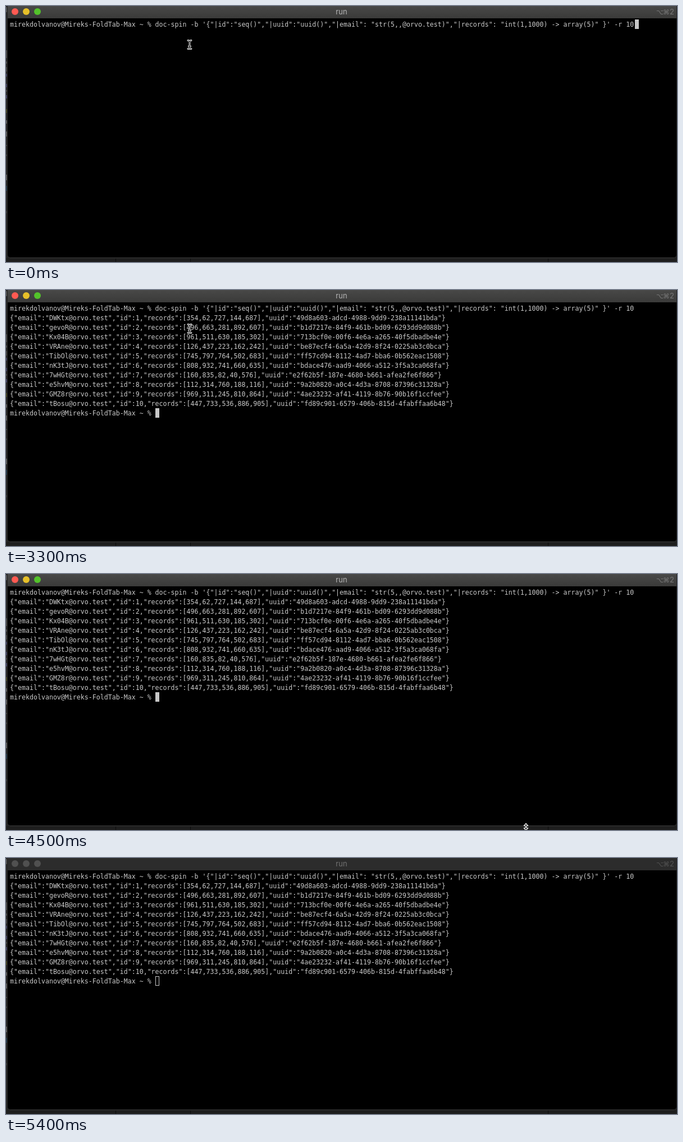
Write an HTML page that moves like this. It is 1195 px wide and 457 px high and loops after 5500 ms.

```html
<!DOCTYPE html>
<html lang="en">
<head>
<meta charset="utf-8">
<title>Terminal</title>
<style>
  html, body { margin: 0; width: 100%; height: 100%; overflow: hidden; background: #1f1f1f; }
  #stage { position: absolute; left: 0; top: 0; width: 1195px; height: 457px; overflow: hidden; }
  svg { position: absolute; left: 0; top: 0; }

  .window {
    position: absolute; left: 3px; top: -1px; width: 1191px; height: 451px;
    box-sizing: border-box; border-bottom: 1px solid #3c3c3c;
    border-radius: 0 0 5px 5px; background: #000; overflow: hidden;
  }
  .bar { position: absolute; inset: 0 0 auto; height: 23px; background: linear-gradient(#494948, #3a3a39); }
  .bar.idle { background: #2c2c2c; }

  .chrome text { font: 13px Inter, "Liberation Sans", sans-serif; text-anchor: middle; }
  .chrome .key { font: 11.5px "DejaVu Sans", sans-serif; }

  pre {
    position: absolute; left: 7px; margin: 0; color: #c9c9c9;
    font: 11.627px/17px "DejaVu Sans Mono", monospace; font-variant-ligatures: none;
  }
  #command { top: 25px; }
  #output { top: 42px; }

  .caret { position: absolute; left: 0; top: 0; width: 7px; height: 17px; box-sizing: border-box; border: 1px solid #c7c7c7; }

  /* Every part holds its state and changes hard. */
  .active, .idle, #output, .caret, #beam, #resize { animation: 5500ms step-end infinite; }
  .active { animation-name: active; }
  .idle { animation-name: idle; }
  #output { animation-name: print; }
  .caret { animation-name: caret; }
  #beam { animation-name: beam; }
  #resize { animation-name: resize; }

  @keyframes active { 0% { visibility: visible } 98.1818%, 100% { visibility: hidden } }
  @keyframes idle { 0% { visibility: hidden } 98.1818%, 100% { visibility: visible } }
  @keyframes print { 0% { visibility: hidden } 43.6363%, 100% { visibility: visible } }
  @keyframes caret {
    0% { transform: translate(1120px, 24px); background: #c7c7c7 }
    43.6363% { transform: translate(266px, 211px); background: #c7c7c7 }
    98.1818%, 100% { transform: translate(266px, 211px); background: transparent }
  }
  @keyframes beam {
    0% { transform: translate(327px, 69px); visibility: visible }
    70.909% { transform: translate(386.5px, 67.5px); visibility: visible }
    73.6363% { transform: translate(425.5px, 56.5px); visibility: visible }
    81.8181%, 100% { transform: translate(425.5px, 56.5px); visibility: hidden }
  }
  @keyframes resize {
    0% { visibility: hidden }
    81.8181% { visibility: visible }
    84.5454%, 100% { visibility: hidden }
  }
</style>
</head>
<body>
<div id="stage">
  <!-- edges of the windows behind -->
  <svg width="1195" height="457">
    <rect width="3" height="457" fill="#262626"/>
    <g id="specks"></g>
    <rect y="450" width="1195" height="7" fill="#1e1e1e"/>
    <path d="M195.5 451v6M328.5 451v6M965.5 451v6" stroke="#0c0c0c"/>
  </svg>

  <div class="window">
    <div class="bar active"></div>
    <div class="bar idle"></div>
  </div>

  <svg class="chrome" width="1195" height="457">
    <g class="active">
      <circle cx="16" cy="10" r="6" fill="#ff5a52"/>
      <circle cx="36" cy="10" r="6" fill="#e6c029"/>
      <circle cx="56" cy="10" r="6" fill="#53c22b"/>
      <g fill="#b8b8b8"><text x="597.5" y="15">run</text></g>
      <g fill="#797979">
        <text class="key" x="1165" y="15">⌥</text><text class="key" x="1176" y="15">⌘</text><text x="1186" y="15">2</text>
      </g>
    </g>
    <g class="idle">
      <g fill="#505050"><circle cx="16" cy="10" r="6"/><circle cx="36" cy="10" r="6"/><circle cx="56" cy="10" r="6"/></g>
      <g fill="#737373"><text x="597.5" y="15">run</text></g>
      <g fill="#545454">
        <text class="key" x="1165" y="15">⌥</text><text class="key" x="1176" y="15">⌘</text><text x="1186" y="15">2</text>
      </g>
    </g>
  </svg>

  <pre id="command"></pre>
  <pre id="output"></pre>
  <div class="caret"></div>

  <svg width="1195" height="457">
    <defs>
      <path id="ibeam" d="M-3-7.5Q0-7.5 0-5V5Q0 7.5-3 7.5M3-7.5Q0-7.5 0-5M0 5Q0 7.5 3 7.5M-1.5 3H1.5"/>
    </defs>
    <g id="beam" fill="none" stroke-linecap="round">
      <use href="#ibeam" stroke="#fff" stroke-width="2.8"/>
      <use href="#ibeam" stroke="#000" stroke-width="1"/>
    </g>
    <g id="resize">
      <path transform="translate(926 451.5)" d="M0-6L3.5-2H1V2H3.5L0 6L-3.5 2H-1V-2H-3.5Z" fill="#000" stroke="#fff" stroke-width="1.2"/>
    </g>
  </svg>
</div>

<script>
  const prompt = 'mirekdolvanov@Mireks-FoldTab-Max ~ % ';
  const domain = 'orvo.test';
  const command = `doc-spin -b '{"|id":"seq()","|uuid":"uuid()","|email": "str(5,,@${domain})","|records": "int(1,1000) -> array(5)" }' -r 10`;

  // user, records, uuid
  const rows = [
    'DWKtx 354,62,727,144,687 49d8a603-adcd-4988-9dd9-238a11141bda',
    'gevoR 496,663,281,892,607 b1d7217e-84f9-461b-bd09-6293dd9d088b',
    'Kx04B 961,511,630,185,302 713bcf0e-00f6-4e6a-a265-40f5dbadbe4e',
    'VRAne 126,437,223,162,242 be87ecf4-6a5a-42d9-8f24-0225ab3c0bca',
    'TibOl 745,797,764,502,683 ff57cd94-8112-4ad7-bba6-0b562eac1508',
    'nK3tJ 808,932,741,660,635 bdace476-aad9-4066-a512-3f5a3ca068fa',
    '7wHGt 160,835,82,40,576 e2f62b5f-187e-4680-b661-afea2fe6f866',
    'e5hvM 112,314,760,188,116 9a2b0820-a0c4-4d3a-8708-87396c31328a',
    'GMZ8r 969,311,245,810,864 4ae23232-af41-4119-8b76-90b16f1ccfee',
    'tBosu 447,733,536,886,905 fd89c901-6579-406b-815d-4fabffaa6b48'
  ];
  const lines = rows.map((row, i) => {
    const [user, records, uuid] = row.split(' ');
    return `{"email":"${user}@${domain}","id":${i + 1},"records":[${records}],"uuid":"${uuid}"}`;
  });

  document.getElementById('command').textContent = prompt + command;
  document.getElementById('output').textContent = [...lines, prompt].join('\n');

  // y, height and colour of the bits showing at the left edge
  const specks = [
    [2, 9, '#5c5c5c'], [79, 14, '#505050'], [99, 4, '#505050'], [109, 8, '#484848'],
    [121, 5, '#45456c'], [139, 6, '#45456c'], [150, 3, '#484848'], [159, 6, '#4a4a74'],
    [184, 7, '#4c4c20'], [204, 6, '#666'], [224, 9, '#666'], [248, 2, '#484848'],
    [265, 3, '#404040'], [301, 10, '#686868'], [321, 9, '#243f55'], [366, 4, '#383838']
  ];
  document.getElementById('specks').innerHTML = specks
    .map(([y, h, fill]) => `<rect y="${y}" width="1.5" height="${h}" fill="${fill}"/>`).join('');
</script>
</body>
</html>
```
